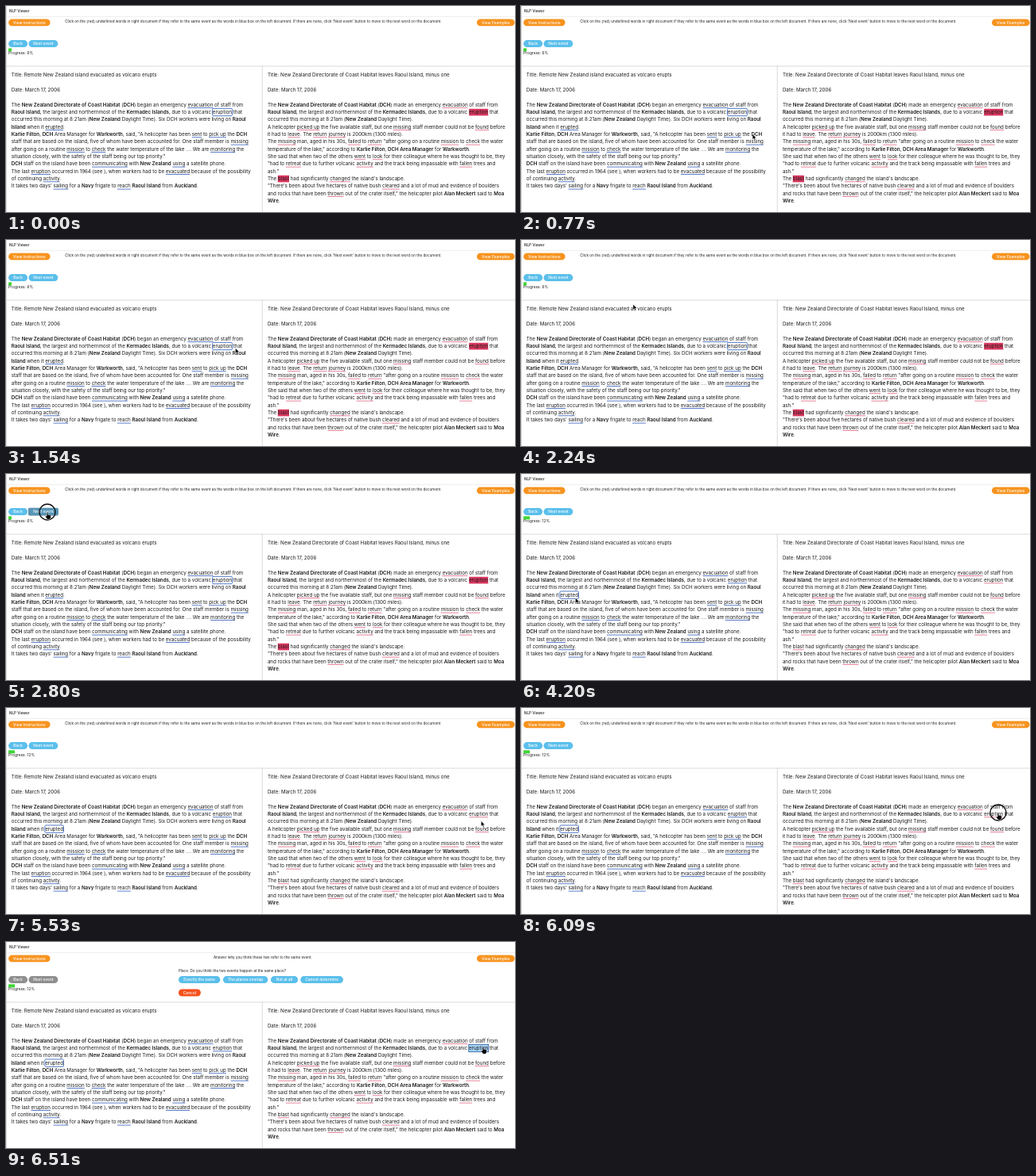
These frames come from a looping animation (640 by 260 pixels, 6580 ms). An HTML page:

```html
<!DOCTYPE html>
<html lang="en">
<head>
<meta charset="utf-8">
<title>NLP Viewer</title>
<style>
html, body { margin: 0; width: 100%; height: 100%; overflow: hidden; background: #fff; }
#app { position: absolute; width: 1440px; height: 585px; overflow: hidden; transform: scale(.444444);
  transform-origin: 0 0; font: 14px/21px Inter, "Liberation Sans", sans-serif; color: #1c1c1c; }
#app > * { position: absolute; white-space: pre; }
.rule { background: #d4d4d4; }
.btn { height: 20px; border-radius: 10px; color: #fff; font-size: 11px; font-weight: 500;
  line-height: 20px; text-align: center; background: #5bbfeb; }
.orange { background: #f7931e; }
.small { font-size: 10.4px; line-height: 16px; }
.story { top: 185px; letter-spacing: -.05px; }
.story b { font-weight: 600; }
.story u { text-decoration: none; border-bottom: 2px solid #4a70c4; }
#right u { border-color: #e2758f; }
.story u.box { border-color: transparent; outline: 2px solid #3d6cc0; border-radius: 2px; }
#right u.match { background: #d9375f; border-color: #d9375f; }
#right u.picked { background: #a5d3f6; border-color: #a5d3f6; outline: 2px solid #2b5fa5; }
.gray .nav { background: #8e8e8e; }
#next.hover { background: #5795b6; border-radius: 3px; box-shadow: 0 0 0 1px #47768f; }
#next.focus { border-radius: 4px; box-shadow: 0 0 0 2px #23557f; }
#bar { left: 7px; top: 120px; height: 9px; background: #3fd535; }
#ring { width: 42px; height: 42px; margin: -24px; border: 3px solid #111; border-radius: 50%; }
</style>
</head>
<body>
<div id="app">
  <div class="rule" style="left:0;top:0;width:2px;height:585px"></div>
  <div class="rule" style="left:0;top:29px;width:1440px;height:1px"></div>
  <div class="rule" style="left:0;top:170px;width:1440px;height:2px"></div>
  <div class="rule" style="left:724px;top:170px;width:2px;height:415px"></div>
  <div class="small" style="left:9px;top:7px;font-weight:500">NLP Viewer</div>
  <div class="btn orange" style="left:7px;top:37px;width:118px">View Instructions</div>
  <div class="btn orange" style="left:1332px;top:37px;width:107px">View Examples</div>
  <div class="small" id="hint" style="top:36px"></div>
  <div class="btn nav" style="left:7px;top:97px;width:54px">Back</div>
  <div class="btn nav" id="next" style="left:64px;top:97px;width:83px">Next event</div>
  <div id="bar"></div>
  <div id="progress" style="left:7px;top:123px;font-size:11px"></div>
  <div id="panel" style="left:488px;top:0"></div>
  <div class="story" id="left" style="left:15px"></div>
  <div class="story" id="right" style="left:740px"></div>
  <div id="ring"></div>
  <svg id="arrow" width="16" height="24"><path d="M1 1V16L4.600 12.700 7 18.500 9.800 17.300 7.400 11.700H12Z" stroke="#fff"/></svg>
  <svg id="hand" width="22" height="24" style="margin:-1px -7px"><path d="M6 2Q8 0 9 3V9Q16 8 17 12V17L14 22H7L1 14Q1 11 5 13Z" stroke="#fff"/></svg>
</div>
<script>
const $ = id => document.getElementById(id);

// *bold* and _event_ markup
const stories = {
left: `Title: Remote New Zealand island evacuated as volcano erupts

Date: March 17, 2006

The *New Zealand Directorate of Coast Habitat* (*DCH*) began an emergency _evacuation_ of staff from
*Raoul Island*, the largest and northernmost of the *Kermadec Islands*, due to a volcanic _eruption_ that
occurred this morning at 8:21am (*New Zealand* Daylight Time). Six DCH workers were living on *Raoul*
*Island* when it _erupted_.
*Karlie Filton*, *DCH* Area Manager for *Warkworth*, said, "A helicopter has been _sent_ to _pick up_ the *DCH*
staff that are based on the island, five of whom have been accounted for. One staff member is _missing_
after going on a routine _mission_ to _check_ the water temperature of the lake .... We are _monitoring_ the
situation closely, with the safety of the staff being our top priority."
*DCH* staff on the island have been _communicating_ with *New Zealand* _using_ a satellite phone.
The last _eruption_ occurred in 1964 (see ), when workers had to be _evacuated_ because of the possibility
of continuing _activity_.
It takes two days' _sailing_ for a *Navy* frigate to _reach_ *Raoul Island* from *Auckland*.`,
right: `Title: New Zealand Directorate of Coast Habitat leaves Raoul Island, minus one

Date: March 17, 2006

The *New Zealand Directorate of Coast Habitat* (*DCH*) made an emergency _evacuation_ of staff from
*Raoul Island*, the largest and northernmost of the *Kermadec Islands*, due to a volcanic _eruption_ that
occurred this morning at 8:21am (*New Zealand* Daylight Time).
A helicopter _picked up_ the five available staff, but one _missing_ staff member could not be _found_ before
it had to _leave_. The _return_ _journey_ is 2000km (1300 miles).
The _missing_ man, aged in his 30s, _failed_ to _return_ "after going on a routine _mission_ to _check_ the water
temperature of the lake," according to *Karlie Filton*, *DCH Area Manager* for *Warkworth*.
She said that when two of the others _went_ to _look_ for their colleague where he was thought to be, they
"had to _retreat_ due to further volcanic _activity_ and the track being impassable with _fallen_ trees and
ash."
The _blast_ had significantly _changed_ the island's landscape.
"There's been about five hectares of native bush _cleared_ and a lot of mud and evidence of boulders
and rocks that have been _thrown_ out of the crater itself," the helicopter pilot *Alan Meckert* said to *Moa*
*Wire*.`
};
for (const id in stories)
  $(id).innerHTML = stories[id].replace(/\*(.+?)\*/g, "<b>$1</b>").replace(/_(.+?)_/g, "<u>$1</u>");

const event = (id, word) => [...$(id).querySelectorAll("u")].find(u => u.textContent === word);
const first = event("left", "eruption"), second = event("left", "erupted");
const match = event("right", "eruption"), blast = event("right", "blast");

const button = (x, y, w, text, color = "#5bbfeb") =>
  `<div class="btn" style="position:absolute;left:${x}px;top:${y}px;width:${w}px;background:${color}">${text}</div>`;
$("panel").innerHTML =
  `<div class="small" style="position:absolute;top:74px">Place: Do you think the two events happen at the same place?</div>` +
  button(0, 97, 118, "Exactly the same") + button(126, 97, 127, "The places overlap") +
  button(261, 97, 77, "Not at all") + button(345, 97, 121, "Cannot determine") +
  button(0, 134, 63, "Cancel", "#f4511e");

const hints = [
  "Click on the (red) underlined words in right document if they refer to the same event as the words in blue box on the left document. If there are none, click 'Next event' button to move to the next word on the document.",
  "Answer why you think these two refer to the same event."
];

// pointer stops: time, x, y
const path = [[0, 302, 264], [70, 302, 264], [1050, 288, 136], [1750, 288, 136], [2590, 52, 48],
  [3570, 52, 48], [4130, 68, 156], [4620, 68, 156], [5180, 590, 150], [5500, 597, 142],
  [5700, 597, 142], [5980, 600, 132], [6580, 600, 132]];

function pointer(t) {
  const i = path.findIndex(p => p[0] > t), [t0, x0, y0] = path[i - 1], [t1, x1, y1] = path[i];
  const k = (t - t0) / (t1 - t0), e = k * k * (3 - 2 * k);
  return [x0 + (x1 - x0) * e, y0 + (y1 - y0) * e];
}

const between = (t, a, b) => t >= a && t < b;
const show = (id, on) => $(id).style.visibility = on ? "visible" : "hidden";

function draw(now) {
  const t = now % 6580, moved = t >= 2940, asked = t >= 6230;
  first.classList.toggle("box", !moved);
  second.classList.toggle("box", moved);
  blast.classList.toggle("match", !moved);
  match.className = asked ? "picked" : moved ? "" : "match";
  $("next").classList.toggle("hover", between(t, 2520, 2940));
  $("next").classList.toggle("focus", between(t, 2940, 3640));
  $("app").classList.toggle("gray", asked);
  show("panel", asked);

  const hint = $("hint"), percent = moved ? 12 : 6;
  hint.textContent = hints[+asked];
  hint.style.left = asked ? "587px" : "167px";
  $("bar").style.width = percent * 1.5 + "px";
  $("progress").textContent = `Progress: ${percent}%`;

  const [x, y] = pointer(t), hand = between(t, 2520, 3400) || t >= 5900;
  for (const id of ["arrow", "hand", "ring"]) {
    $(id).style.left = x * 2.25 + "px";
    $(id).style.top = y * 2.25 + "px";
  }
  show("hand", hand);
  show("arrow", !hand && !between(t, 3400, 3570));
  show("ring", between(t, 2690, 2940) || between(t, 6020, 6230));
  requestAnimationFrame(() => draw(performance.now()));
}
draw(performance.now());
</script>
</body>
</html>
```
